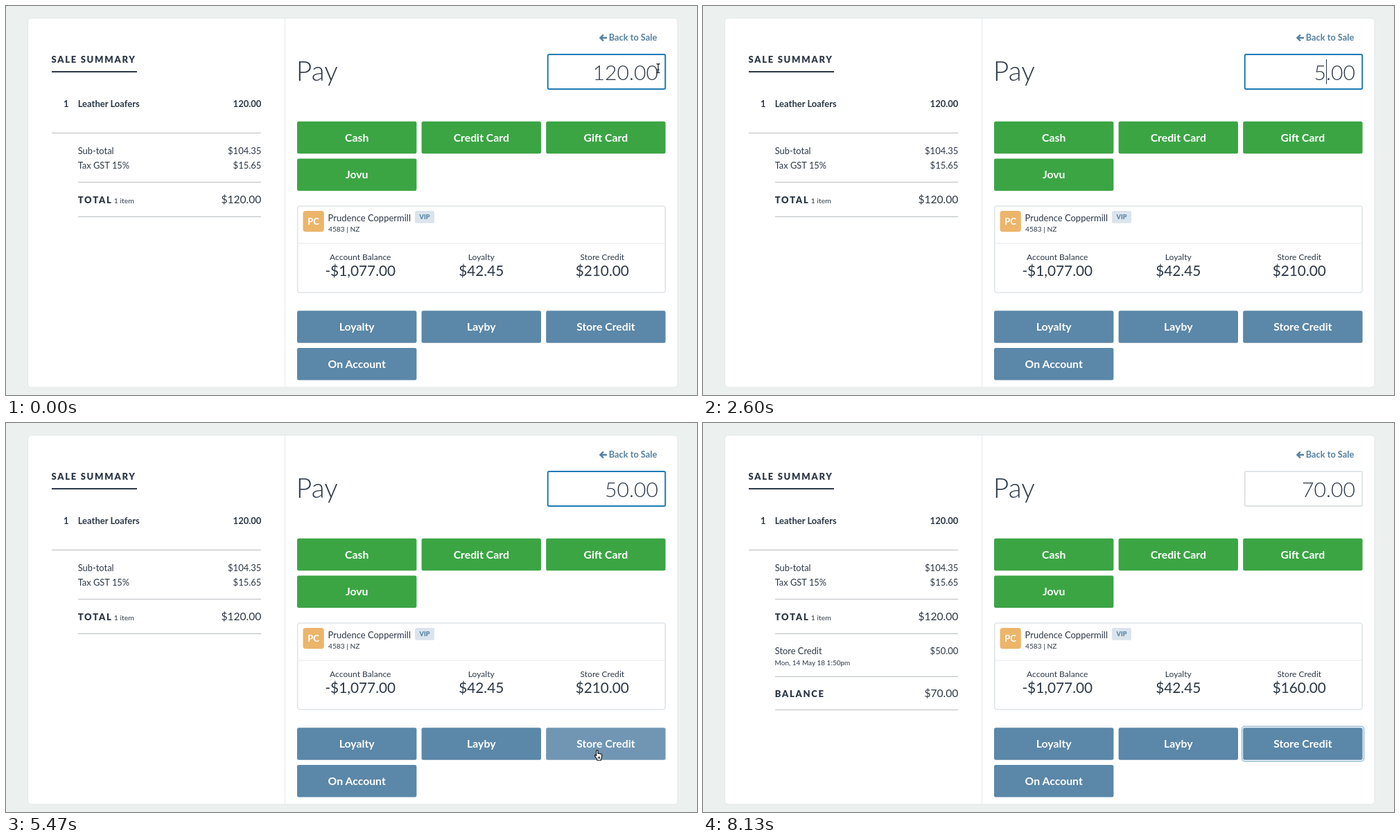
Write an HTML page that moves like this. It is 997x562 px and loops after 8.79 s.

```html
<!DOCTYPE html>
<html lang="en">
<head>
<meta charset="utf-8">
<title>Split payment</title>
<style>
  html, body { margin: 0; width: 100%; height: 100%; overflow: hidden; background: #ecf1f0; }
  svg { display: block; width: 997px; height: 562px; font-family: Lato, sans-serif; }
  text { fill: #2c3847; white-space: pre; }
  .caps { font-weight: 900; letter-spacing: 1.73px; }
  .bold { font-weight: 700; }
  .thin { font-weight: 300; }
  .white { font-weight: 700; fill: #fff; }
  .link { font-weight: 700; fill: #54809f; }
  .tag { font-weight: 900; fill: #5b87a8; }
  .end { text-anchor: end; }
  .mid { text-anchor: middle; }
</style>
</head>
<body>
<svg id="stage" viewBox="0 0 997 562" xmlns="http://www.w3.org/2000/svg"></svg>
<script>
const NS = 'http://www.w3.org/2000/svg';
const LOOP = 8790, TICK = 200 / 3;
const GREEN = [59, 165, 68], BLUE = [91, 135, 168], LIGHT = [112, 150, 179], DARK = [82, 127, 160];
const FOCUS = [31, 121, 180], IDLE = [223, 228, 232];
let layer = document.getElementById('stage');

const rgb = c => `rgb(${c.map(Math.round)})`;

function add(tag, attrs) {
  const el = document.createElementNS(NS, tag);
  for (const k in attrs) el.setAttribute(k, attrs[k]);
  return layer.appendChild(el);
}
const rect = (x, y, width, height, fill, more) => add('rect', { x, y, width, height, fill, ...more });
const line = (x1, x2, y, stroke = '#b9bdc0') => add('path', { d: `M${x1} ${y}H${x2}`, stroke });
function label(str, x, y, size, cls = '') {
  const el = add('text', { x, y, 'font-size': size, class: cls });
  el.textContent = str;
  return el;
}
// Summary row: name on the left, value flush right
function row(name, value, y, cls = '', nameSize = 12.9, valueSize = 13) {
  label(name, 103.7, y, nameSize, cls);
  label(value, 368.4, y, valueSize, cls === 'bold' ? 'bold end' : 'end');
}

rect(31.5, 17.5, 937.5, 533.5, '#fff', { rx: 5, stroke: '#e2e7e8' });
add('path', { d: 'M402.5 18V551', stroke: '#e4e8ea' });

// Sale summary
label('SALE SUMMARY', 65.5, 81.7, 13, 'caps');
rect(66, 94, 123, 2, '#2c3847');
label('1', 83, 146.2, 13, 'bold');
row('Leather Loafers', '120.00', 146.2, 'bold', 13);
line(66, 368, 183.5);
row('Sub-total', '$104.35', 213.6);
row('Tax GST 15%', '$15.65', 234.8);
line(104, 368, 254.5);
row('TOTAL', '$120.00', 284.6, 'caps', 13, 15.6);
label('1 item', 155.8, 284.6, 10.4);
line(104, 368, 304.5);

const paid = layer = add('g', {});
row('Store Credit', '$50.00', 333.9);
label('Mon, 14 May 18 1:50pm', 103.6, 350.3, 10);
line(104, 368, 366.5);
row('BALANCE', '$70.00', 396.2, 'caps', 13, 15.6);
line(104, 368, 414.5);
layer = paid.parentNode;

// Header
add('path', { d: 'M862 41.6L857.4 46 862 50.4M858 46H867', fill: 'none', stroke: '#54809f', 'stroke-width': 2.3 });
label('Back to Sale', 939.3, 50.2, 12.8, 'link end');
label('Pay', 418.8, 107.6, 39, 'thin');
const field = rect(781.75, 70, 169.5, 50, '#fff', { rx: 2, 'stroke-width': 2 });
const amount = label('', 941, 107, 30.2, 'thin end');
const caret = rect(899, 77, 1, 36, '#2c3847');

// Payment buttons, three to a row
const ring = rect(777.6, 438.3, 176, 50.4, 'none', { rx: 4, stroke: '#9cc0d8', 'stroke-width': 1.6 });
function buttons(names, top, color) {
  return names.map((name, i) => {
    const x = 420 + i % 3 * 179.6, y = top + Math.floor(i / 3) * 53.9;
    const box = rect(x, y, 172.4, 46.5, rgb(color), { rx: 2.5 });
    label(name, x + 86.2, y + 28.8, 15.8, 'white mid');
    return box;
  });
}
const gift = buttons(['Cash', 'Credit Card', 'Gift Card', 'Jovu'], 166.7, GREEN)[2];
const credit = buttons(['Loyalty', 'Layby', 'Store Credit', 'On Account'], 440.2, BLUE)[2];

// Customer card
rect(420.75, 289, 530.5, 125, '#fff', { rx: 3.5, stroke: '#dfe4e8', 'stroke-width': 1.6 });
line(421.5, 950.5, 343, '#e3e7ea');
rect(428.5, 296, 30.3, 30.3, '#ecb56b', { rx: 4 });
label('PC', 443.6, 315.7, 13, 'white mid');
label('Prudence Coppermill', 464.6, 310.8, 13);
label('4583 | NZ', 465, 326.4, 10.2);
rect(590, 296, 28, 17.7, '#dbe4ed', { rx: 2 });
label('VIP', 604, 308.2, 9, 'tag mid');
function stat(name, value, x) {
  label(name, x, 366.7, 12.1, 'mid');
  return label(value, x, 389.6, 20.8, 'mid');
}
stat('Account Balance', '-$1,077.00', 511.3);
stat('Loyalty', '$42.45', 685.8);
const store = stat('Store Credit', '$210.00', 860.3);

// Pointers, drawn around their middle
function pointer(d, fill, stroke, width = 1.1) {
  return add('path', { d, fill, stroke, 'stroke-width': width, 'stroke-linejoin': 'round' });
}
const pointers = {
  beam: pointer('M-2.5-6.5Q0-6.5 0-5 0-6.5 2.5-6.5M0-5V5M-2.5 6.5Q0 6.5 0 5 0 6.5 2.5 6.5M-1.5 2H1.5', 'none', '#222', 1.3),
  arrow: pointer('M-4-7V5L-1.2 2.4.6 6.5 2.5 5.7.7 1.8H4.4Z', '#111', '#fff'),
  hand: pointer('M-3-6.2a1.2 1.2 0 0 1 2.4 0V-2.4Q.5-3 1.3-2.3 2.5-2.8 3.1-1.9 5-2.1 5-.4V2Q5 4 3.8 5.4V7.2H-2V5.6' +
    'L-4.9 1.6Q-5.8 0-4.7-.4-3.8-.5-3 .8ZM.1 2V5M1.8 2V5', '#fff', '#111')
};

// Motion rules
const keys = [[0, '120'], [470, '120'], [1070, '12'], [1470, '1'], [2000, ''], [2500, '5'], [2800, '50']];
const PRESS = 5500, PAID = 5930;

const ramp = (t, from, to) => Math.min(1, Math.max(0, (t - from) / (to - from)));
const ease = k => k * k * (3 - 2 * k);
const mix = (a, b, k) => a.map((v, i) => v + (b[i] - v) * k);

function pointerAt(t) {
  const hidden = t > 130 && t < 3790 || t > 7270;
  const go = ease(ramp(t, 3750, 4980)), leave = ease(ramp(t, 6600, 7300));
  const [x, y] = mix(mix([941, 90], [854.7, 480], go), [1006, 497], leave);
  const overGift = y > 167 && y < 213, overCredit = y > 446 && x < 952;
  const kind = hidden ? '' : y < 121 ? 'beam' : overGift || overCredit ? 'hand' : 'arrow';
  return { x, y, kind, overGift: !hidden && overGift };
}

function draw(t) {
  const q = Math.floor((t + 7) / TICK) * TICK;
  const done = t >= PAID;
  const [struck, digits] = keys.filter(k => k[0] <= t).pop();
  const caretOn = t >= 470 && t < PRESS && (t - struck) % 930 < 530;
  amount.textContent = (done ? '70' : digits) + '.00';
  caret.setAttribute('opacity', caretOn ? 1 : 0);
  store.textContent = done ? '$160.00' : '$210.00';
  paid.setAttribute('visibility', done ? 'visible' : 'hidden');

  const hover = ramp(q, 4800, 5070) - ramp(q, 6860, 7200);
  const press = ramp(q, PRESS, 5640) - ramp(q, 5760, 6100);
  credit.setAttribute('fill', rgb(mix(mix(BLUE, LIGHT, hover), DARK, press)));
  field.setAttribute('stroke', rgb(mix(FOCUS, IDLE, ramp(q, 5590, 5676))));
  ring.setAttribute('opacity', ramp(q, PRESS, 5900));

  const p = pointerAt(q);
  gift.setAttribute('fill', rgb(mix(GREEN, [255, 255, 255], p.overGift ? .06 : 0)));
  for (const kind in pointers) {
    pointers[kind].setAttribute('visibility', kind === p.kind ? 'visible' : 'hidden');
    pointers[kind].setAttribute('transform', `translate(${p.x} ${p.y})`);
  }
}

const start = performance.now();
function frame() {
  draw((performance.now() - start) % LOOP);
  requestAnimationFrame(frame);
}
frame();
</script>
</body>
</html>
```
